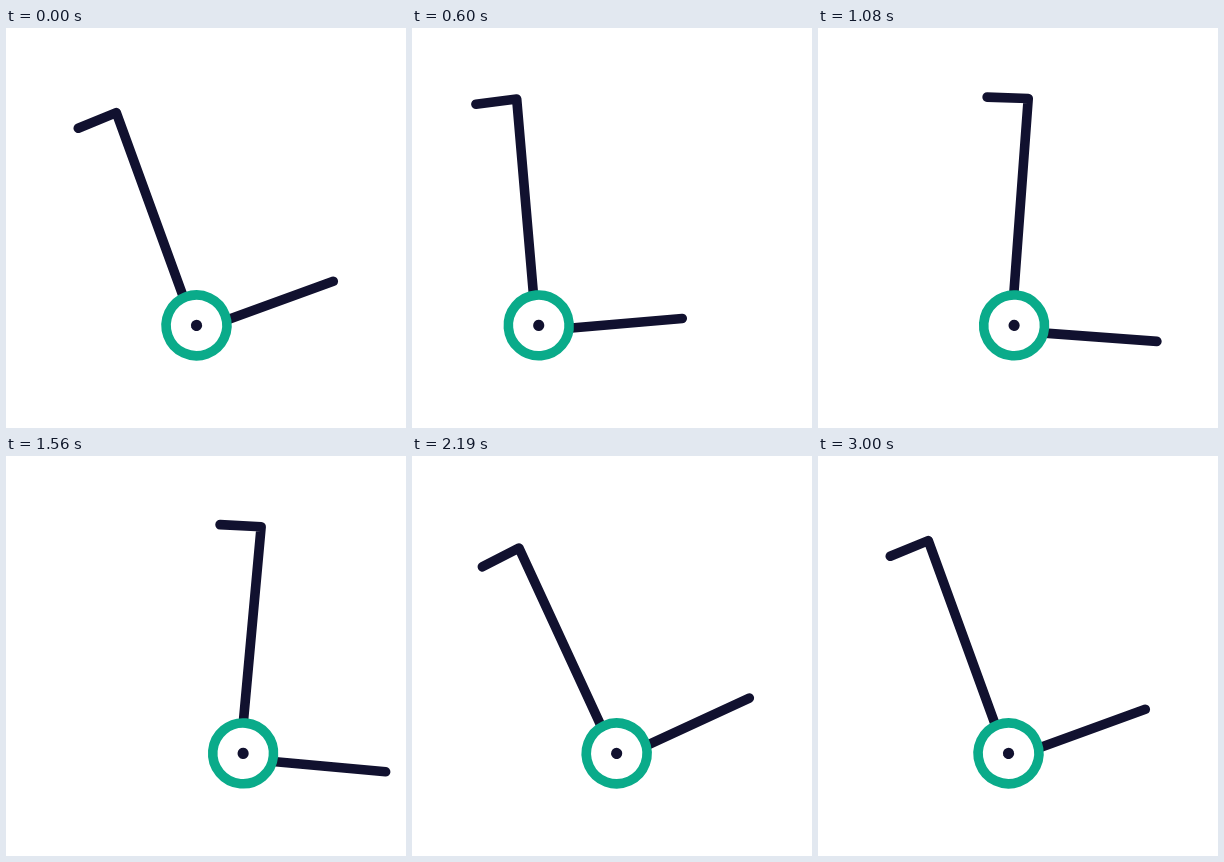
An HTML page that plays this animation: 400 px wide and 400 px high, repeating every 5.03 s.

```html
<!DOCTYPE html>
<html lang="en">
<head>
<meta charset="utf-8">
<title>Hand truck</title>
<style>
  html, body { margin: 0; width: 100%; height: 100%; overflow: hidden; background: #fff; }
  svg { display: block; width: 100%; height: 100%; }
</style>
</head>
<body>
<svg viewBox="0 0 400 400">
  <g id="truck" fill="none" stroke="#11112f" stroke-width="9.6" stroke-linecap="round" stroke-linejoin="round">
    <path d="M-43.7-225.7L-2.6-227.4V5.4H143.6"/>
    <circle r="30.4" fill="#fff" stroke="#0aab8a"/>
    <circle r="5.6" fill="#11112f" stroke="none"/>
  </g>
</svg>
<script>
const LOOP = 5030, STEP = 30, REST_X = 190.5, REST_ANGLE = -20;
const truck = document.getElementById('truck');

// Cubic easing with flat ends; a and b are the horizontal handles.
function ease(p, a, b) {
  let lo = 0, hi = 1;
  for (let i = 0; i < 24; i++) {
    const s = (lo + hi) / 2;
    const x = 3 * s * (1 - s) * (a * (1 - s) + b * s) + s * s * s;
    if (x < p) lo = s; else hi = s;
  }
  return lo * lo * (3 - 2 * lo);
}

// Eased change by a given amount between two times.
function glide(t, from, to, amount, a = 0.36, b = 0.64) {
  const p = Math.min(1, Math.max(0, (t - from) / (to - from)));
  return amount * ease(p, a, b);
}

// Back up, push forward, pull back, settle.
const rollAt = t => REST_X
  + glide(t, 0, 575, -64.3)
  + glide(t, 575, 1640, 111.8, 0.19, 0.51)
  + glide(t, 1640, 2510, -62.7, 0.52, 0.78)
  + glide(t, 2510, 3000, 15.2);

// Tip forward, lean back, settle.
const tiltAt = t => REST_ANGLE
  + glide(t, 0, 1380, 25.2, 0.4, 0.3)
  + glide(t, 1640, 2220, -30.2)
  + glide(t, 2640, 3000, 5);

function draw(ms) {
  const t = Math.floor((ms % LOOP) / STEP) * STEP;
  truck.setAttribute('transform',
    `translate(${rollAt(t).toFixed(2)} 297.4) rotate(${tiltAt(t).toFixed(2)})`);
}

const start = performance.now();
function tick() {
  draw(performance.now() - start);
  requestAnimationFrame(tick);
}
tick();
</script>
</body>
</html>
```
